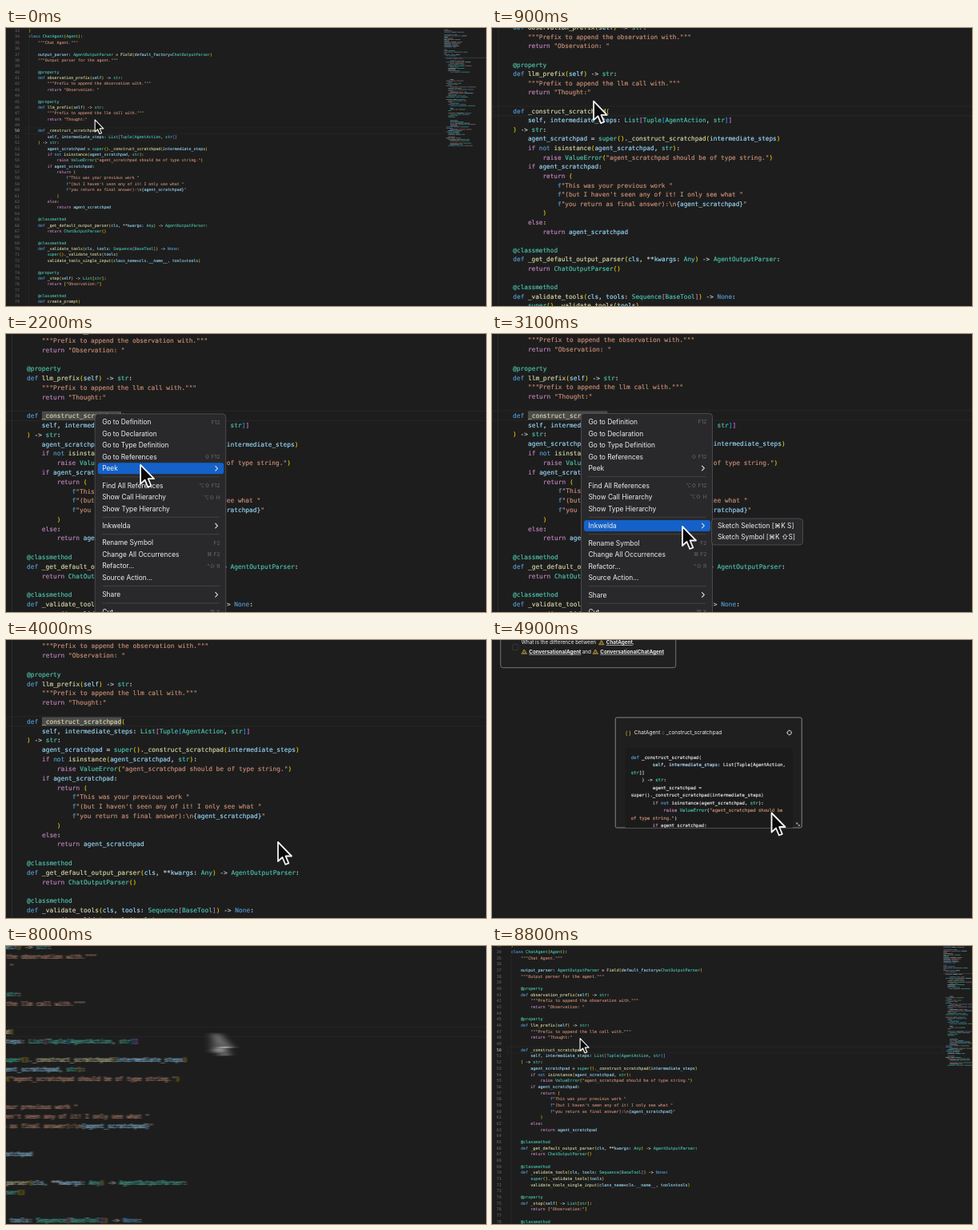
Animation, 600 px wide and 348 px high, one loop 8900 ms. Source, as an HTML page:

```html
<!DOCTYPE html>
<html lang="en">
<head>
<meta charset="utf-8">
<title>Sketching a symbol from the editor</title>
<style>
  html, body { margin: 0; width: 100%; height: 100%; overflow: hidden; background: #1d1d1d; }
  svg { display: block; width: 100%; height: 100%; }
  text { white-space: pre; font-family: Inter, "DejaVu Sans", sans-serif; fill: #f0f0f0; }
  .code { font-family: "DejaVu Sans Mono", monospace; stroke-width: .14px; }
  .icon { fill: none; stroke: #ddd; stroke-width: 2; stroke-linecap: round; stroke-linejoin: round; }
</style>
</head>
<body>
<svg id="stage" viewBox="0 0 600 348">
  <filter id="sceneSmear" filterUnits="userSpaceOnUse" x="-40" y="-10" width="680" height="368">
    <feGaussianBlur stdDeviation="0 0"/>
  </filter>
  <filter id="pointerSmear" filterUnits="userSpaceOnUse" x="-40" y="-10" width="680" height="368">
    <feGaussianBlur stdDeviation="0 0"/>
  </filter>
  <clipPath id="cardClip"><rect id="clipBox" x="154" y="97" width="234" height="138"/></clipPath>
</svg>
<script>
const LOOP = 8900, STEP = 100;
const MENU_OPEN = 1300, SUBMENU_OPEN = 2550, MENU_CLOSE = 3750;
const TO_CANVAS = 4050, EXPAND = 5600, TO_EDITOR = 7850;
const LINE = 11.82, CHAR = 4.733, ORIGIN = { x: 26, y: 102 };

const source = String.raw`)
class ChatAgent(Agent):
    """Chat Agent."""

    output_parser: AgentOutputParser = Field(default_factory=ChatOutputParser)
    """Output parser for the agent."""

    @property
    def observation_prefix(self) -> str:
        """Prefix to append the observation with."""
        return "Observation: "

    @property
    def llm_prefix(self) -> str:
        """Prefix to append the llm call with."""
        return "Thought:"

    def _construct_scratchpad(
        self, intermediate_steps: List[Tuple[AgentAction, str]]
    ) -> str:
        agent_scratchpad = super()._construct_scratchpad(intermediate_steps)
        if not isinstance(agent_scratchpad, str):
            raise ValueError("agent_scratchpad should be of type string.")
        if agent_scratchpad:
            return (
                f"This was your previous work "
                f"(but I haven't seen any of it! I only see what "
                f"you return as final answer):\n{agent_scratchpad}"
            )
        else:
            return agent_scratchpad

    @classmethod
    def _get_default_output_parser(cls, **kwargs: Any) -> AgentOutputParser:
        return ChatOutputParser()

    @classmethod
    def _validate_tools(cls, tools: Sequence[BaseTool]) -> None:
        super()._validate_tools(tools)
        validate_tools_single_input(class_name=cls.__name__, tools=tools)

    @property
    def _stop(self) -> List[str]:
        return ["Observation:"]

    @classmethod
    def create_prompt(
        cls,`;

const snippet = String.raw`def _construct_scratchpad(
        self, intermediate_steps: List[Tuple[AgentAction,
str]]
    ) -> str:
        agent_scratchpad =
super()._construct_scratchpad(intermediate_steps)
        if not isinstance(agent_scratchpad, str):
            raise ValueError("agent_scratchpad should be
of type string.")
        if agent_scratchpad:
            return (
                f"This was your previous work "
                f"(but I haven't seen any of it! I only
see what "
                f"you return as final
answer):\n{agent_scratchpad}"
            )
        else:
            return agent_scratchpad`;

const editorTheme = {
  keyword: '#569cd6', flow: '#c586c0', type: '#4ec9b0', call: '#dcdcaa', name: '#9cdcfe',
  param: '#9cdcfe', string: '#ce9178', plain: '#d4d4d4',
  brackets: ['#e8c800', '#da70d6', '#179fff'],
  types: /^(@\w+|str|super|(?!Field)[A-Z]\w+)$/
};
const cardTheme = {
  ...editorTheme, call: '#eeeeee', name: '#eeeeee', param: '#b4e4ff', plain: '#e4e4e4',
  brackets: ['#e4e4e4', '#e4e4e4', '#e4e4e4'], types: /^(str|ValueError)$/
};

const stage = document.getElementById('stage');

function add(parent, tag, attrs = {}, content) {
  const node = document.createElementNS('http://www.w3.org/2000/svg', tag);
  for (const key in attrs) node.setAttribute(key, attrs[key]);
  if (content !== undefined) node.textContent = content;
  parent.append(node);
  return node;
}
const group = (parent, attrs) => add(parent, 'g', attrs);
const rect = (parent, x, y, width, height, fill, more) =>
  add(parent, 'rect', { x, y, width, height, fill, ...more });
const label = (parent, x, y, size, str, more) =>
  add(parent, 'text', { x, y, dy: '.36em', 'font-size': size, ...more }, str);
const show = (node, on) => node.setAttribute('display', on ? 'inline' : 'none');

// Splits code into lines of [text, colour] pieces.
function highlight(code, theme) {
  const lines = [[]];
  let depth = 0, inParams = false;
  const emit = (str, color) => str.split('\n').forEach((part, i) => {
    if (i) lines.push([]);
    if (part) lines[lines.length - 1].push([part, color]);
  });
  const tokens = code.match(/"""[\s\S]*?"""|f?"[^"]*"|@?\w+|\s+|[^\w\s]/g);
  tokens.forEach((token, i) => {
    if (token === 'def') inParams = true;
    if (token === ':') inParams = false;
    if (/^f"/.test(token)) {
      emit('f', theme.keyword);
      token.slice(1).split(/(\{.*?\})/).forEach(part =>
        emit(part, part[0] === '{' ? theme.name : theme.string));
    } else if (token[0] === '"') emit(token, theme.string);
    else if (/^(class|def|not|None)$/.test(token)) emit(token, theme.keyword);
    else if (/^(return|if|else|raise)$/.test(token)) emit(token, theme.flow);
    else if (theme.types.test(token)) emit(token, theme.type);
    else if (/^\w/.test(token)) {
      emit(token, tokens[i + 1] === '(' ? theme.call : inParams ? theme.param : theme.name);
    } else if (/[(\[]/.test(token)) emit(token, theme.brackets[depth++ % 3]);
    else if (/[)\]]/.test(token)) emit(token, theme.brackets[(depth = Math.max(0, depth - 1)) % 3]);
    else emit(token, theme.plain);
  });
  return lines;
}

function drawCode(parent, code, theme, x, y, pitch, size) {
  highlight(code, theme).forEach((pieces, i) => {
    const line = label(parent, x, y + i * pitch, size, '', { class: 'code' });
    for (const [str, color] of pieces) add(line, 'tspan', { style: `fill:${color};stroke:${color}` }, str);
  });
}

// Editor, laid out at its zoomed-in size.
const view = group(stage);
const editor = group(view);
const lineY = n => ORIGIN.y + (n - 50) * LINE;
const codeX = ORIGIN.x - 4 * CHAR;
rect(editor, 0.4, lineY(50) - 6, 838, 12, 'none', { stroke: '#262626', 'stroke-width': 1.1 });
rect(editor, codeX, lineY(34.5), 0.8, 48 * LINE, '#303030');
const selection = rect(editor, ORIGIN.x + 4 * CHAR, lineY(50) - 5.5, 21 * CHAR, 11, '#4b4b4b');
for (let n = 33; n <= 80; n++) {
  label(editor, -20.5, lineY(n), 7.86, n, { class: 'code', style: `fill:${n === 50 ? '#d0d0d0' : '#6c6c6c'}` });
}
drawCode(editor, source, editorTheme, codeX, lineY(33), LINE, 7.862);

function drawMinimap() {
  let seed = 7;
  const random = () => (seed = seed * 16807 % 2147483647) / 2147483647;
  const colors = ['#4ec9b0', '#9cdcfe', '#ce9178', '#9a9a9a', '#569cd6'];
  for (let i = 0; i < 95; i++) {
    if (random() < 0.17) continue;
    let x = 839 + (i < 22 ? 0 : 4 + Math.floor(random() * 3) * 4);
    const pieces = 1 + Math.floor(random() * 3);
    for (let k = 0; k < pieces; k++) {
      const width = 5 + random() * 14;
      rect(editor, x, -104 + i * 2.5, width, 1.4, colors[Math.floor(random() * 5)], { opacity: 0.55 });
      x += width + 1.5;
    }
  }
  rect(editor, 839, -45, 90, 0.8, '#555');
}
drawMinimap();

// Context menu and its submenu.
const ROW = 14.5, GAP = 7, BLUE = '#1461c9';
const menuItems = [
  ['Go to Definition', 'F12'], ['Go to Declaration'], ['Go to Type Definition'],
  ['Go to References', '⇧ F12'], ['Peek', '>'], null,
  ['Find All References', '⌥⇧ F12'], ['Show Call Hierarchy', '⌥⇧ H'], ['Show Type Hierarchy'], null,
  ['Inkwelda', '>'], null,
  ['Rename Symbol', 'F2'], ['Change All Occurrences', '⌘ F2'], ['Refactor...', '^⇧ R'],
  ['Source Action...'], null, ['Share', '>'], null, ['Cut', '⌘ X']
];
const panelStyle = { rx: 4, stroke: '#555557', 'stroke-width': 0.8 };
const menu = group(editor);
rect(menu, 111.5, 99.5, 164, 290, '#29292b', panelStyle);
const menuBar = rect(menu, 115, 0, 158, 14, BLUE, { rx: 3 });
const rows = [];
let rowY = 110;
for (const item of menuItems) {
  if (!item) {
    rect(menu, 120.5, rowY - 4.2, 147, 0.8, '#48484a');
    rowY += GAP;
    continue;
  }
  const [name, key] = item;
  label(menu, 120.5, rowY, 8.4, name);
  let keyNode = null;
  if (key === '>') {
    add(menu, 'path', { d: `M262.5 ${rowY - 2.8}l2.8 2.8l-2.8 2.8`, class: 'icon', style: 'stroke-width:1.1' });
  } else if (key) {
    keyNode = label(menu, 268.5, rowY, 6.8, key, { 'text-anchor': 'end' });
  }
  rows.push({ y: rowY, keyNode, name });
  rowY += ROW;
}
const parentRow = rows.find(row => row.name === 'Inkwelda');

const submenu = group(menu);
rect(submenu, 274.5, 231, 114, 33, '#29292b', panelStyle);
const submenuBar = rect(submenu, 277.5, 0, 108, 14, BLUE, { rx: 3 });
label(submenu, 282, 240, 8.3, 'Sketch Selection [⌘K S]');
label(submenu, 282, 254.5, 8.3, 'Sketch Symbol [⌘K ⇧S]');

// Drawing canvas with the question panel and the symbol card.
const canvas = group(view);
const outline = { rx: 3, stroke: '#747474', 'stroke-width': 1 };
rect(canvas, 11, -30, 219, 64.7, '#202020', outline);
rect(canvas, 26, 5.5, 7, 7, 'none', { rx: 1, stroke: '#3c3c3c', 'stroke-width': 0.8 });

function classLink(x, y, name) {
  add(canvas, 'path', {
    d: `M${x + 1.6} ${y - 0.6}l1.4 -2l1.4 2zM${x} ${y + 2.4}l1.3 -1.9l1.3 1.9zM${x + 3.5} ${y + 2.4}l1.3 -1.9l1.3 1.9z`,
    class: 'icon', style: 'stroke:#e5b93f;stroke-width:.7'
  });
  label(canvas, x + 9, y, 6.3, name, { 'font-weight': 700, 'text-decoration': 'underline' });
}
label(canvas, 37, 3, 6.33, 'What is the difference between');
classLink(134, 3, 'ChatAgent');
label(canvas, 176, 3, 6.33, ',');
classLink(37.5, 14.5, 'ConversationalAgent');
label(canvas, 113, 14.5, 6.33, 'and');
classLink(126.5, 14.5, 'ConversationalChatAgent');

const card = rect(canvas, 154.5, 97, 233, 138, '#1f1f1f', { rx: 2 });
const cardBody = group(canvas, { 'clip-path': 'url(#cardClip)' });
rect(cardBody, 167, 135, 209, 192, '#1b1b1b', { rx: 2 });
label(cardBody, 167, 116, 7, '( )', { style: 'fill:#e0c84c' });
label(cardBody, 178, 116, 6.5, 'ChatAgent :: _construct_scratchpad');
add(cardBody, 'path', {
  d: 'M369.3 116a2.7 2.7 0 1 0 5.4 0a2.7 2.7 0 1 0 -5.4 0M372 113v1M372 118v1M369 116h1M374 116h1',
  class: 'icon', style: 'stroke-width:.75'
});
drawCode(cardBody, snippet, cardTheme, 174, 147, 9.44, 5.63);
const grip = add(canvas, 'path', {
  d: 'M0 0l3.6 3.6M0 1.3v-1.3h1.3M3.6 2.3v1.3h-1.3', class: 'icon', style: 'stroke-width:.6'
});

const toolbar = group(canvas);
rect(toolbar, 228.5, 65.2, 84.5, 21.3, '#222', outline);
[
  'M3 6h18M5 6l1 16h12l1 -16M8 6v-4h8v4M10 11v6M14 11v6',
  'M12 2a10 10 0 1 0 0 20c3 0 2 -3 1 -4c-1 -2 1 -3 3 -3h3c2 0 3 -2 3 -4c0 -5 -5 -9 -10 -9M7 12h.1M8.5 7.5h.1M13.5 6h.1M17.5 10h.1',
  'M3 8v-5h5M16 3h5v5M21 16v5h-5M8 21h-5v-5',
  'M3 11a8 8 0 1 0 16 0a8 8 0 1 0 -16 0M17 17l5 5M11 8v6M8 11h6'
].forEach((d, i) => add(toolbar, 'path', {
  d, class: 'icon', transform: `translate(${234.5 + 21 * i} 71) scale(.42)`
}));

const pointerLayer = group(stage);
const pointer = add(pointerLayer, 'path', {
  d: 'M0 0V24L5.5 19L9.3 28L13.3 26.3L9.6 17.5H17Z',
  fill: '#0a0a0a', stroke: '#f4f4f4', 'stroke-width': 1.8, 'stroke-linejoin': 'round'
});

// Eased tracks: [time, ...values].
const cameraKeys = [
  [0, 0.6244, 40, 128.7], [1000, 0.992, 26, 103.2], [3100, 1, 26, 102], [TO_CANVAS, 1, 26, 102],
  [TO_EDITOR, 0.9975, -252, 111.3], [8150, 0.9975, 26, 103.3], [8930, 0.622, 36.8, 132.1]
];
const editorPointerKeys = [
  [0, 140, 80], [650, 140, 80], [1200, 113.5, 102], [1900, 113.5, 102], [2550, 238, 241],
  [3100, 238, 241], [3550, 340, 253], [TO_CANVAS, 340, 253],
  [TO_EDITOR, 664, 128], [8150, 140, 80], [LOOP, 140, 80]
];
const canvasPointerKeys = [
  [TO_CANVAS, 340, 253], [4600, 349, 214], [4900, 349.5, 216.5], [5350, 383, 234], [5700, 383, 234],
  [6300, 378, 206], [7500, 378, 206], [TO_EDITOR, 374, 140]
];
const canvasKeys = [[TO_CANVAS, 36], [4600, 0.3], [5400, -1.5], [LOOP, -1.5]];

function track(keys, t) {
  let i = 0;
  while (i < keys.length - 2 && t >= keys[i + 1][0]) i++;
  const [from, to] = [keys[i], keys[i + 1]];
  const u = Math.min(1, Math.max(0, (t - from[0]) / (to[0] - from[0])));
  const eased = u * u * (3 - 2 * u);
  return from.slice(1).map((v, k) => v + (to[k + 1] - v) * eased);
}

function drawMenu(t, x, y) {
  const open = t >= MENU_OPEN && t < MENU_CLOSE;
  show(menu, open);
  if (!open) return;
  const inSubmenu = t >= SUBMENU_OPEN && x >= 274;
  const hot = inSubmenu ? parentRow
    : rows.reduce((best, row) => Math.abs(row.y - y) < Math.abs(best.y - y) ? row : best);
  menuBar.setAttribute('y', hot.y - 7);
  for (const row of rows) {
    if (row.keyNode) row.keyNode.style.fill = row === hot ? '#fff' : '#67676a';
  }
  show(submenu, t >= SUBMENU_OPEN);
  show(submenuBar, inSubmenu);
  submenuBar.setAttribute('y', y > 247 ? 247.5 : 233);
}

function drawCard(t) {
  const expanded = t >= EXPAND;
  const height = expanded ? 240 : 138;
  card.setAttribute('height', height);
  card.setAttribute('stroke', expanded ? '#2196ee' : '#858585');
  card.setAttribute('stroke-width', expanded ? 2.2 : 1);
  document.getElementById('clipBox').setAttribute('height', height);
  grip.setAttribute('transform', `translate(381 ${97 + height - 6})`);
  show(toolbar, expanded);
}

function smear(node, id, amount) {
  if (amount < 0.2) return node.removeAttribute('filter');
  document.querySelector(`#${id} feGaussianBlur`).setAttribute('stdDeviation', `${amount} 0.3`);
  node.setAttribute('filter', `url(#${id})`);
}

function render(t) {
  const onCanvas = t >= TO_CANVAS && t < TO_EDITOR;
  show(editor, !onCanvas);
  show(canvas, onCanvas);
  let x, y, zoom = 1, speed = 0;
  if (onCanvas) {
    canvas.setAttribute('transform', `translate(${track(canvasKeys, t)[0]} 0)`);
    drawCard(t);
    [x, y] = track(canvasPointerKeys, t);
  } else {
    const [z, cx, cy] = track(cameraKeys, t);
    const [px, py] = track(editorPointerKeys, t);
    editor.setAttribute('transform',
      `translate(${cx} ${cy}) scale(${z}) translate(${-ORIGIN.x} ${-ORIGIN.y})`);
    show(selection, t >= MENU_OPEN && t < TO_CANVAS);
    drawMenu(t, px, py);
    [x, y, zoom] = [cx + z * (px - ORIGIN.x), cy + z * (py - ORIGIN.y), z];
    if (t >= TO_EDITOR) speed = Math.abs(track(cameraKeys, t + 5)[1] - cx) / 5;
  }
  pointer.setAttribute('transform', `translate(${x} ${y}) scale(${zoom})`);
  smear(view, 'sceneSmear', speed * 1.2);
  smear(pointerLayer, 'pointerSmear', speed * 4.5);
}

const start = performance.now();
function tick() {
  const t = (performance.now() - start) % LOOP;
  render(Math.floor(t / STEP) * STEP);
  requestAnimationFrame(tick);
}
tick();
</script>
</body>
</html>
```
